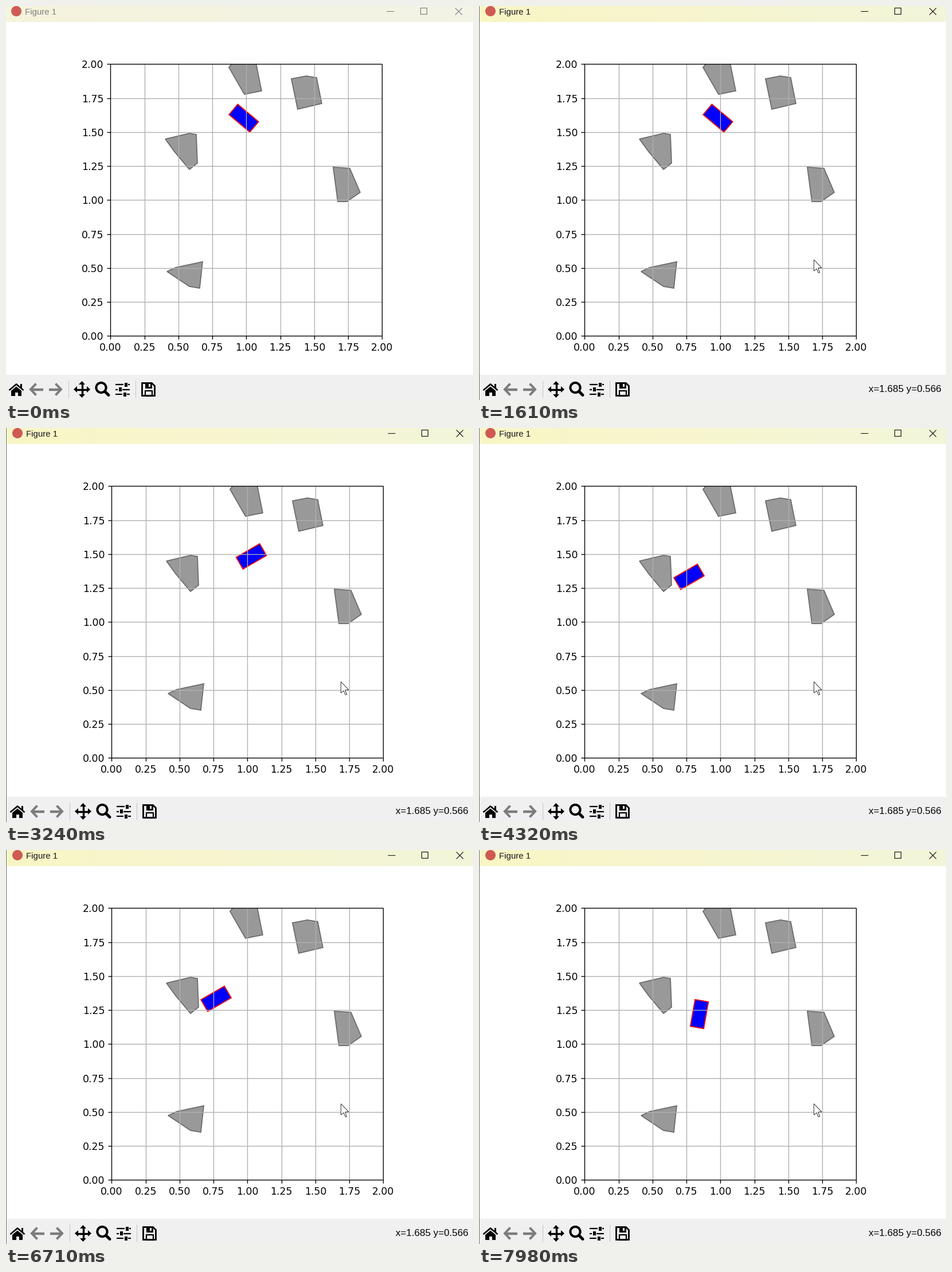
A matplotlib script for the animation above (8 s loop, 815 by 687 pixels).

```python
import numpy as np
import matplotlib.pyplot as plt
from matplotlib.animation import FuncAnimation
from matplotlib.lines import Line2D
from matplotlib.patches import Circle, Polygon, Rectangle
from matplotlib.transforms import Affine2D

W, H, DPI = 815, 687, 72          # at 72 dpi one point is one pixel
STEP, LOOP = 20, 8000
X0, Y0, UNIT = 182.4, 575.3, 237  # plot origin and pixels per data unit
SIDE = 2 * UNIT
HAIR, PATCH_LW, TICK = 1.39, 1.74, 6.08
BAR, INK, GREY = "#f0f0f0", "black", "#7c7c7c"

fig = plt.figure(figsize=(W / DPI, H / DPI), dpi=DPI, facecolor="white")
ax = fig.add_axes([0, 0, 1, 1])
ax.axis("off")

shift = Affine2D()
world = shift + ax.transData


def put(artist, z=5):
    artist.set_zorder(z)
    return ax.add_artist(artist)


def rect(x, y, w, h, fc="none", ec="none", lw=0, z=5, tr=world):
    return put(Rectangle((x, y), w, h, fc=fc, ec=ec, lw=lw, transform=tr), z)


def disc(x, y, r, fc="none", ec="none", lw=0):
    return put(Circle((x, y), r, fc=fc, ec=ec, lw=lw, transform=world))


def poly(pts, fc=INK, ec="none", lw=0, z=5):
    return put(Polygon(pts, closed=True, fc=fc, ec=ec, lw=lw,
                       joinstyle="miter", transform=world), z)


def stroke(pts, lw, color=INK, z=5, cap="butt"):
    x, y = zip(*pts)
    return put(Line2D(x, y, lw=lw, color=color, transform=world,
                      solid_capstyle=cap, solid_joinstyle="miter"), z)


def label(x, y, s, size=17.36, font="DejaVu Sans", **kw):
    return ax.text(x, y, s, fontsize=size, family=font, transform=world,
                   zorder=6, **kw)


# Window background
TITLE_H, BAR_Y = 28, 643
still = ax.transData
rect(0, 0, W, TITLE_H, "#f3f3f3", z=0, tr=still)
rect(0, BAR_Y, W, H - BAR_Y, BAR, z=0, tr=still)
ramp = np.linspace([249, 246, 197], [243, 245, 218], 163)[None] / 255
tint = ax.imshow(ramp, extent=(0, W, TITLE_H, 0), aspect="auto",
                 interpolation="nearest", zorder=0.5)
right_edge = rect(W - 1, 0, 1, H, "#e4e4e4", z=9, tr=still)
left_edge = rect(0, 0, 1, H, "#707070", z=9, tr=still)
ax.set_xlim(0, W)
ax.set_ylim(H, 0)

# Title bar
disc(18, 9, 9, "#cf5a54")
title = label(33, 14.5, "Figure 1", 15, "Liberation Sans", va="baseline")
buttons = [
    stroke([(664, 9), (677, 9)], 1.1),
    stroke([(784, 3.5), (796, 15.5)], 1.2),
    stroke([(784, 15.5), (796, 3.5)], 1.2),
]
maximise = rect(723, 3, 11, 11, ec=INK, lw=1.2)
maximise.set_joinstyle("round")

# Plot
frame = rect(X0, Y0 - SIDE, SIDE, SIDE, ec=INK, lw=HAIR, z=4)
for k in range(9):
    x, y = X0 + k * SIDE / 8, Y0 - k * SIDE / 8
    if 0 < k < 8:
        stroke([(x, Y0), (x, Y0 - SIDE)], HAIR, "#b0b0b0", 3)
        stroke([(X0, y), (X0 + SIDE, y)], HAIR, "#b0b0b0", 3)
    stroke([(x, Y0), (x, Y0 + TICK)], HAIR)
    stroke([(X0, y), (X0 - TICK, y)], HAIR)
    text = f"{k / 4:.2f}"
    label(x, Y0 + 2 * TICK, text, ha="center", va="top")
    label(X0 - 2 * TICK, y, text, ha="right", va="center_baseline")

OBSTACLES = [
    [(389, 107), (428, 58), (446, 148), (416, 154)],
    [(498, 127), (524, 122), (542, 125), (551, 170), (509, 180)],
    [(278, 232), (320, 222), (332, 224), (334, 274), (320, 285), (294, 254)],
    [(571, 281), (600, 283), (618, 325), (595, 341), (579, 341)],
    [(281, 463), (296, 456), (343, 446), (338, 492), (320, 489)],
]
for pts in OBSTACLES:
    poly(pts, "#999999", "#6a6a6a", PATCH_LW, 1).set_clip_path(frame)
car = poly([(0, 0)] * 4, "blue", "red", PATCH_LW, 2)


# Toolbar icons
def home(cx, cy):
    stroke([(cx - 12.5, cy + 1.5), (cx, cy - 9), (cx + 12.5, cy + 1.5)], 2.6)
    rect(cx + 7, cy - 9.5, 3.4, 7, INK)
    poly([(cx - 9, cy + 2.5), (cx, cy - 5), (cx + 9, cy + 2.5),
          (cx + 9, cy + 11.5), (cx - 9, cy + 11.5)])
    rect(cx - 2.5, cy + 5, 5, 7, BAR)


def arrow(tip, cy, d):
    stroke([(tip + 12 * d, cy - 10), (tip + 2.5 * d, cy),
            (tip + 12 * d, cy + 10)], 4, GREY)
    stroke([(tip + 3 * d, cy), (tip + 24 * d, cy)], 4.4, GREY)


def pan(cx, cy):
    for ux, uy in [(1, 0), (0, 1), (-1, 0), (0, -1)]:
        stroke([(cx, cy), (cx + 10 * ux, cy + 10 * uy)], 3.4)
        poly([(cx + a * ux - b * uy, cy + a * uy + b * ux)
              for a, b in [(14.5, 0), (8.5, 5.5), (8.5, -5.5)]])


def zoom(cx, cy):
    disc(cx, cy, 8.6, ec=INK, lw=4)
    stroke([(cx + 6.5, cy + 6.5), (cx + 13, cy + 13)], 5, cap="round")


def sliders(x, cy):
    for row, knob in enumerate([18, 8, 16]):
        y = cy + 8.7 * (row - 1)
        stroke([(x, y), (x + 25, y)], 2.2)
        rect(x + knob - 4, y - 3.5, 8, 7, BAR)
        rect(x + knob - 2.5, y - 3.5, 5, 7, INK)


def save(x, y):
    poly([(x, y), (x + 17, y), (x + 22, y + 5), (x + 22, y + 22),
          (x, y + 22)], BAR, INK, 2.8)
    rect(x + 5, y, 12, 9, INK)
    rect(x + 11, y + 1, 3, 5, BAR)
    rect(x + 5, y + 13, 12, 9, ec=INK, lw=2.2)


home(18, 668.5)
arrow(40.5, 668.5, 1)
arrow(98.5, 668.5, -1)
pan(132.5, 668.5)
zoom(166, 665.5)
sliders(191, 668.7)
save(237.5, 657.5)
for x in (109, 226):
    stroke([(x, 653), (x, 683)], 1, "#c4c4c4")

readout = label(804.5, 673, "x=1.685 y=0.566", 17, "Liberation Sans",
                ha="right", va="baseline")
POINTER = [(0, 0), (0, 19.5), (4.5, 15.5), (8, 23), (10.3, 22), (7.2, 14.5),
           (13.5, 14)]
pointer = poly([(582.5 + x, 442.5 + y) for x, y in POINTER],
               "white", "#222222", 0.9, 8)

# Evenly spaced key presses: first, last, count, turn (degrees), drive
RUNS = [
    (2280, 3240, 7, 10, 0),
    (3370, 4320, 6, 0, 0.05),
    (5050, 5320, 2, 0, -0.05),
    (5650, 5850, 2, 0, 0.05),
    (5980, 5980, 1, -10, 0),
    (6710, 7570, 6, 10, 0),
    (7780, 7980, 2, 0, 0.05),
]


def pose(t):
    x, y, angle = 1.09, 1.576, 140
    for first, last, count, turn, drive in RUNS:
        pressed = np.sum(t >= np.linspace(first, last, count))
        angle += turn * pressed
        x += drive * pressed * np.cos(np.radians(angle))
        y += drive * pressed * np.sin(np.radians(angle))
    return x, y, np.radians(angle)


def car_corners(t, length=0.2, width=0.1):
    x, y, a = pose(t)
    c, s = np.cos(a), np.sin(a)
    return [(X0 + UNIT * (x + u * c - v * s), Y0 - UNIT * (y + u * s + v * c))
            for u, v in [(0, 0), (length, 0), (length, width), (0, width)]]


def fade(t, first, last, steps):
    return np.mean(t >= np.linspace(first, last, steps))


def update(i):
    t = i * STEP + STEP / 2
    moved = t >= 1070
    shift.clear().translate(2 if moved else 0, 0)
    left_edge.set_visible(moved)
    right_edge.set_visible(800 <= t < 1070)

    focus = fade(t, 1400, 1610, 4)
    tint.set_alpha(0.5 if t < 130 else focus)
    shade = str(0.5 - 0.4 * focus)
    title.set_color(shade)
    maximise.set_edgecolor(shade)
    for b in buttons:
        b.set_color(shade)

    seen = fade(t, 330, 470, 3)
    pointer.set_alpha(seen)
    readout.set_visible(seen > 0)
    car.set_xy(car_corners(t))
    return []


anim = FuncAnimation(fig, update, frames=LOOP // STEP, interval=STEP,
                     init_func=lambda: update(0), repeat=True, repeat_delay=0)
plt.show()
```
